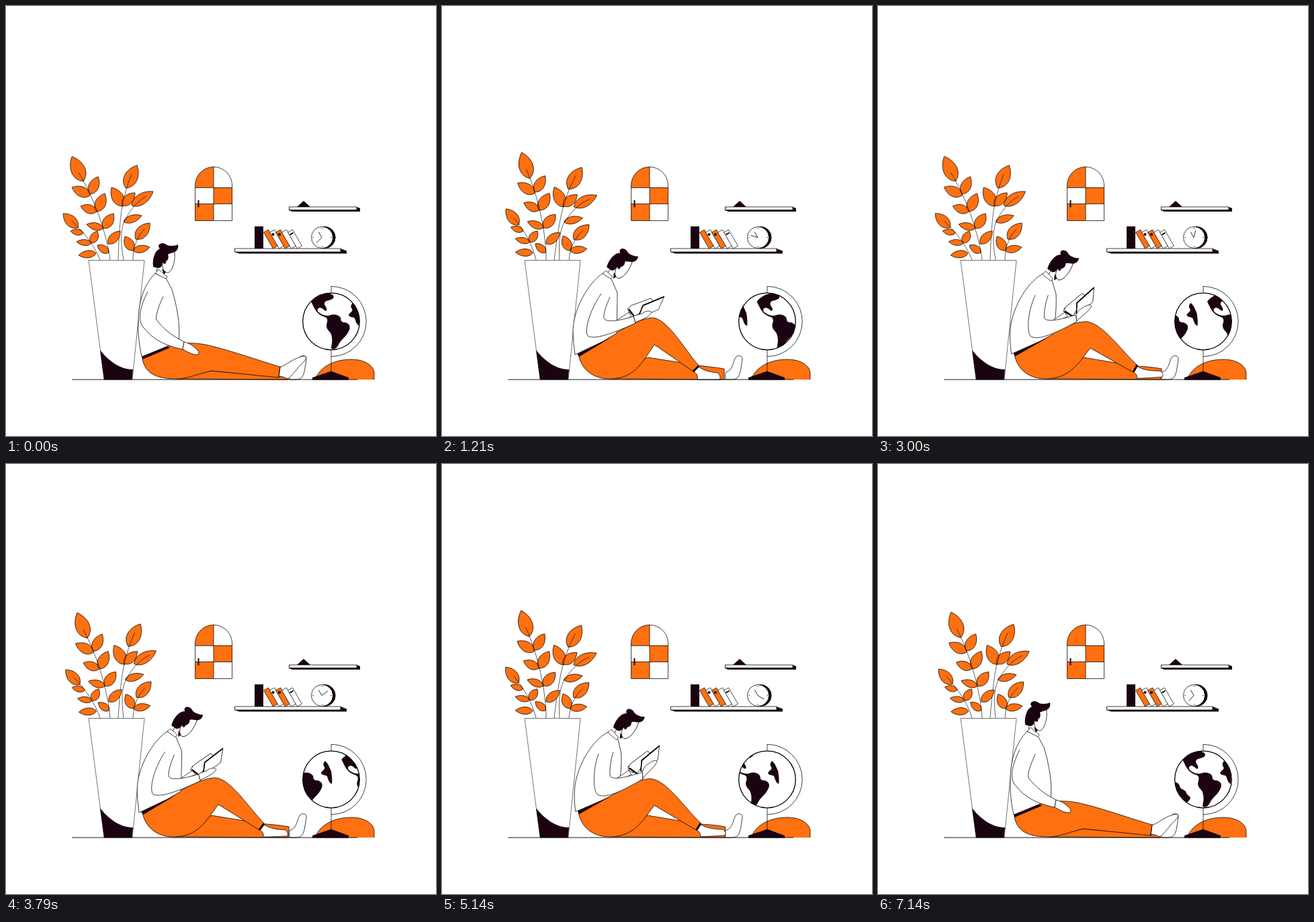
An HTML page with a canvas that plays this animation: 640 by 640 pixels, repeating every 7210 ms.

```html
<!DOCTYPE html>
<html lang="en">
<head>
<meta charset="utf-8">
<title>Reading at home</title>
<style>
html, body { margin: 0; width: 100%; height: 100%; overflow: hidden; background: #fff; }
canvas { display: block; width: 100vw; height: 100vh; }
</style>
</head>
<body>
<canvas id="stage" width="640" height="640"></canvas>
<script>
const ctx = document.getElementById('stage').getContext('2d');
const LOOP = 7210, FPS = 14;
const ORANGE = '#ff7010', INK = '#1b0412', LINE = '#000', WHITE = '#fff';
const RAD = Math.PI / 180;

const clamp = x => Math.max(0, Math.min(1, x));
const smooth = x => x * x * (3 - 2 * x);
const lerp = (a, b, u) => a + (b - a) * u;

// Eased value from [time, value] keys
function track(t, keys) {
  if (t <= keys[0][0]) return keys[0][1];
  for (let i = 1; i < keys.length; i++) {
    const [t0, v0] = keys[i - 1], [t1, v1] = keys[i];
    if (t <= t1) return lerp(v0, v1, smooth((t - t0) / (t1 - t0)));
  }
  return keys[keys.length - 1][1];
}

// Blend two path strings that share the same commands
const NUM = /-?\d+(\.\d+)?/g;
function mix(a, b, u) {
  const nums = b.match(NUM);
  let i = 0;
  return a.replace(NUM, n => lerp(+n, +nums[i++], u).toFixed(2));
}

function shape(d, fill, stroke = LINE, width = 0.75) {
  const path = new Path2D(d);
  if (fill) { ctx.fillStyle = fill; ctx.fill(path); }
  if (stroke) { ctx.strokeStyle = stroke; ctx.lineWidth = width; ctx.stroke(path); }
}
const line = (d, width = 0.75) => shape(d, null, LINE, width);
const solid = (d, fill = INK) => shape(d, fill, null);

function disc(x, y, r, fill, width = 0.75) {
  ctx.beginPath();
  ctx.arc(x, y, r, 0, 7);
  if (fill) { ctx.fillStyle = fill; ctx.fill(); }
  if (width) { ctx.strokeStyle = LINE; ctx.lineWidth = width; ctx.stroke(); }
}

function placed(x, y, deg, scale, draw) {
  ctx.save();
  ctx.translate(x, y);
  ctx.rotate(deg * RAD);
  ctx.scale(scale, scale);
  draw();
  ctx.restore();
}

// Stems swing about their base; a leaf is [base x, base y, tip x, tip y, width]
const STEMS = [
  { x: 167, swing: 6, d: 'M167 378C168 340 170 315 173 298C176 282 181 264 187 250',
    leaves: [[178, 271, 195, 237, 20], [174, 298, 157, 270, 17], [173, 297, 192, 278, 14]] },
  { x: 175, swing: 7.4, d: 'M175 378C170 350 170 330 178 317C186 302 195 291 209 283',
    leaves: [[187, 297, 219, 276, 16], [175, 321, 202, 312, 11]] },
  { x: 189, swing: 6, d: 'M189 378C189 360 194 345 206 332',
    leaves: [[193, 347, 214, 323, 17], [189, 364, 177, 343, 14], [189, 364, 214, 359, 11]] },
  { x: 155, swing: 8.4, d: 'M155 378C150 340 132 287 108 248',
    leaves: [[115, 261, 98, 224, 21], [125, 282, 98, 270, 15], [125, 280, 137, 254, 15],
      [135, 306, 111, 298, 13], [135, 306, 147, 279, 16], [145, 331, 120, 325, 11],
      [145, 331, 160, 309, 15], [152, 354, 170, 335, 13], [153, 367, 136, 356, 11]] },
  { x: 140, swing: 9, d: 'M140 378C132 358 118 338 98 320',
    leaves: [[107, 330, 85, 309, 16], [115, 338, 96, 335, 9], [127, 353, 105, 351, 9],
      [127, 353, 136, 335, 12], [134, 368, 108, 371, 11]] }
];

function leaf([x, y, tx, ty, w]) {
  const dx = tx - x, dy = ty - y, len = Math.hypot(dx, dy);
  const at = (u, side) => [x + dx * u - dy / len * side, y + dy * u + dx / len * side].join(' ');
  const s = w * 0.66;
  shape(`M${x} ${y}C${at(0.2, s)} ${at(0.65, s)} ${tx} ${ty}C${at(0.65, -s)} ${at(0.2, -s)} ${x} ${y}Z`, ORANGE);
}

function plant(t) {
  const u = Math.abs(((t + 73) / 1611) % 2);
  const sway = smooth(u < 1 ? u : 2 - u);
  for (const stem of STEMS) {
    placed(stem.x, 378, stem.swing * sway, 1, () => {
      ctx.translate(-stem.x, -378);
      stem.leaves.forEach(leaf);
      line(stem.d, 0.6);
    });
  }
  shape('M123 378.5H206L188 556H146Z', WHITE, LINE, 0.55);
  solid('M140 512C151 526 168 541 189 541L187.500 556H146Z');
}

function wall() {
  solid('M281.500 270V267A27.500 27.500 0 0 1 309 239.500V270ZM309 270H336.500V294.500H309ZM281.500 294.500H309V319.500H281.500Z', ORANGE);
  line('M281.500 319.500V267A27.500 27.500 0 0 1 336.500 267V319.500ZM309 239.500V319.500M281.500 270.500H336.500M281.500 294.500H336.500');
  solid('M285.500 289H287.500V299.500H285.500Z');

  solid('M421 299H522L527 301V306H426L421 304Z');
  shape('M421.500 299H522V303.500H421.500Z', WHITE);
  solid('M433 299L443 290L453 299Z');

  solid('M340 361H498L507 364.500V368.500H347L340 366Z');
  shape('M340.500 361H498V366H340.500Z', WHITE);
  solid('M370 328H383V361H370Z');
  [ORANGE, WHITE, ORANGE, WHITE, WHITE].forEach((fill, i) => {
    const x = 383.500 + i * 9;
    shape(`M${x} 337L${x + 7} 333L${x + 21} 357L${x + 14} 361Z`, fill, LINE, 0.7);
  });
  disc(397.5, 340, 2.1, INK, 0);
  disc(407, 340, 2.1, INK, 0);
  line('M422.500 340.500L427.500 337.500', 2);
}

function clock(t) {
  disc(474, 344.5, 16.2, INK);
  disc(470.5, 344.5, 16, WHITE);
  line('M470.500 330V332M470.500 357V359M456 344.500H458M483 344.500H485', 0.6);
  const hand = (deg, len) => placed(470, 344.5, deg, 1, () => line(`M0 0V${-len}`));
  hand(-30, 9.5);
  hand(225 + 360 * t / LOOP, 11);
}

const AMERICAS = 'M454 440C459 433 468 428 476 428C484 427 490 431 487 435C483 439 476 437 474 442C473 446 479 449 477 453C475 456 472 449 467 449C463 450 462 454 467 457C471 460 476 461 480 461C487 458 495 459 498 464C499 468 498 471 505 471C512 473 514 478 509 486C505 493 499 496 495 504C492 510 488 512 484 510C484 505 487 499 484 489C483 484 476 482 477 474C479 468 479 465 475 463C467 461 461 455 458 448Z';
const AFRICA = 'M516 442C520 445 522 450 525 457C526 464 527 470 526 476C522 475 521 470 519 465C517 462 511 464 510 460C511 456 517 455 515 451C512 447 514 444 516 442Z';
const SOUTH = 'M440 474C447 473 448 477 450 482C454 486 457 484 459 490C461 494 465 494 465 498C463 500 462 504 458 504L438 494Z';

function globe(t) {
  shape('M460 556C467 537 488 526 514 526C536 526 548 537 548 546V556Z', ORANGE, null);
  line('M460 556C467 537 488 526 514 526C536 526 548 537 548 546V556');
  line('M484 417.300A52.200 52.200 0 0 1 484 521.700M484 417V427M484 512V547');
  solid('M456 553L484 543.500L510 553V556.500H456Z');
  disc(484, 469.5, 42.3, WHITE, 0);
  ctx.save();
  ctx.clip();
  const period = 86.5, shift = period * t / LOOP;
  for (const dx of [shift, shift - period]) {
    ctx.save();
    ctx.translate(dx, 0);
    solid(AMERICAS);
    solid(AFRICA);
    ctx.restore();
  }
  if (t > 5500) {
    ctx.translate(0.012 * (t - 7140), 0);
    solid(SOUTH);
  }
  ctx.restore();
  disc(484, 469.5, 42.3, null, 1.3);
}

// Each part: [legs out, knees up, second reading stance]
const BODY = {
  farLeg: [
    'M255 555L306 543L406 552C414 552 420 550 422 548L420 556Z',
    'M250 555L306 523L383 535C396 537 410 538 420 540L420 556Z',
    'M250 555L306 523L384 537C396 536 410 537 424 540L422 556Z'],
  nearLeg: [
    'M203 525C207 548 225 555 255 555C270 555 290 546 306 543L406 553L408 537C380 529 330 511 297 504C280 501 262 500 242 507Z',
    'M203 518C207 543 228 556 252 555C285 553 295 536 316 504L374 544L382 535C361 511 336 466 314 464C294 464 266 484 242 495Z',
    'M203 518C207 543 228 556 252 555C285 553 297 534 316 513L384 546L388 533C362 514 333 476 307 474C288 474 266 482 242 495Z'],
  shoe: [
    'M408 537L412 536C421 531 434 521 446 521C449 526 440 532 435 538C430 545 424 551 420 555C415 553 411 551 406 551Z',
    'M374 544L382 537C390 543 401 545 410 546C414 549 415 553 413 556C402 556 390 556 380 556C381 551 380 547 374 544Z',
    'M384 546L389 536C398 541 413 542 428 541C432 544 432 547 431 549C418 551 403 552 390 553C390 550 389 548 384 546Z'],
  cuff: ['M406 553L408 537', 'M374 544L382 536', 'M385 545L389 533'],
  belt: [
    'M202 522L241 506L243 509L203 526Z',
    'M201 518L240 499L254 492L204 522Z',
    'M202 516L240 500L253 494L204 521Z'],
  torso: [
    'M222 398C205 415 197 441 197 470C196 490 199 508 202 522L241 506L257 499C260 475 254 445 247 422L238 405Z',
    'M239 398C218 412 196 450 195 482C195 500 197 510 198 519L240 499L260 487C260 470 261 445 261 427L251 404Z',
    'M250 399C219 414 199 460 198 486C197 500 198 510 199 517L240 500L260 490C267 474 270 446 268 430L265 411Z'],
  arm: [
    'M211 425C197 453 196 470 206 480C222 500 244 507 263 511L265 500C245 490 232 478 224 467C222 460 229 443 234 432',
    'M237 428C218 456 212 484 217 491C225 496 244 492 288 472L285 462C265 468 246 472 241 465C240 458 245 444 250 433',
    'M232 432C226 455 228 485 235 492C245 498 262 493 302 468L302 458C276 466 258 470 253 465C251 455 253 440 256 428'],
  hand: [
    'M265 500C274 502 280 507 285 512C288 516 287 519 284 519C277 519 271 515 263 511Z',
    'M285 462C292 458 296 460 300 456C306 453 311 454 312 456C308 463 299 466 288 471Z',
    'M302 458C302 450 306 444 313 441C318 437 323 437 322 440C318 449 311 454 302 467Z'],
  collar: [
    'M222 398L227 392L240 403L238 406Z',
    'M239 398L244 394L254 403L251 406Z',
    'M249 400L254 395L265 408L262 412Z']
};

const HAIR = 'M219 388C218 381 219 374 222 368C224 364 227 362 229 361C225 357 228 353 233 353C238 353 238 357 246 357C250 357 254 356 256 355C257 361 255 364 251 366C247 368 243 368 241 370C243 376 240 379 238 380C239 384 236 385 233 382C233 387 230 390 227 390C223 389 220 389 219 388Z';

function head(x, y, deg) {
  placed(x, y, deg, 1, () => {
    ctx.translate(-230, -396);
    solid('M225 386L224 399L238 405V390Z', WHITE);
    line('M225 388L224 397', 0.7);
    solid('M232 391L238 396L235 400Z');
    shape('M251 366C252 379 249 391 243 396C239 399 234 394 233 388L232 375L241 366Z', WHITE);
    solid(HAIR);
  });
}

function book(x, y, deg, scale) {
  if (scale <= 0) return;
  placed(x, y, deg, scale, () => {
    shape('M-17 -8L-12 -13L18 -24L22 -19L-7 4Z', WHITE);
    line('M-15 -8L-6 4', 2);
    shape('M0 2L6 -14L38 -27L29 -7L6 2Z', WHITE, LINE, 0.7);
    line('M0 2L6 -13L37 -26', 1.6);
  });
}

function man(t) {
  const sit = track(t, [[60, 0], [1150, 1], [6160, 1], [7090, 0]]);
  const lean = track(t, [[1210, 0], [2350, 1], [3700, 0.08], [5000, 0.82], [6140, 0]]);
  const knee = track(t, [[1210, 0], [2290, 0.8], [3790, 0.3], [5140, 0.45], [6140, 1]]);
  const tilt = track(t, [[1210, 0], [2290, -23], [3790, -15], [5140, -17], [6140, 9]]);
  const pose = (part, u) => {
    const [out, up, alt] = BODY[part];
    return mix(out, mix(up, alt, u), sit);
  };

  shape(pose('farLeg', knee), ORANGE);
  shape('M422 556C422 550 421 546 423 545C434 542 433 527 438 522C442 519 448 521 447 526C445 537 445 545 441 552C438 556 433 556 422 556Z', WHITE);
  shape(pose('nearLeg', knee), ORANGE);
  shape(pose('shoe', knee), WHITE);
  line(pose('cuff', knee), lerp(0.8, 3, sit));

  const hx = lerp(230, 252 + 12.4 * lean, sit);
  const hy = lerp(396, 400 + 4.5 * lean, sit);
  head(hx, hy, sit * 23.5);
  shape(pose('torso', lean), WHITE);
  solid(pose('belt', lean));
  shape(pose('collar', lean), WHITE, LINE, 0.7);

  const grip = smooth(clamp((sit - 0.45) / 0.55));
  if (grip > 0) {
    const fx = lerp(262, 278, grip), fy = lerp(470, 456, grip);
    shape(`M260 468L${fx} ${fy}L${fx + 4} ${fy + 6}L262 472Z`, WHITE, LINE, 0.7);
    shape(`M${fx} ${fy}L${fx - 1} ${fy - 6}L${fx + 3} ${fy - 7}L${fx + 7} ${fy + 4}Z`, WHITE, LINE, 0.7);
  }
  book(lerp(270, 293 + 3 * lean, sit), lerp(500, 459 - 4.5 * lean, sit), tilt, grip);
  shape(pose('arm', lean), WHITE);
  shape(pose('hand', lean), WHITE);
}

function draw(now) {
  const t = Math.floor((now % LOOP + 4) * FPS / 1000) * 1000 / FPS;
  ctx.fillStyle = WHITE;
  ctx.fillRect(0, 0, 640, 640);
  ctx.lineJoin = 'round';
  wall();
  clock(t);
  plant(t);
  globe(t);
  man(t);
  line('M98 556H523', 0.9);
}

const start = performance.now();
function tick() {
  draw(performance.now() - start);
  requestAnimationFrame(tick);
}
tick();
</script>
</body>
</html>
```
